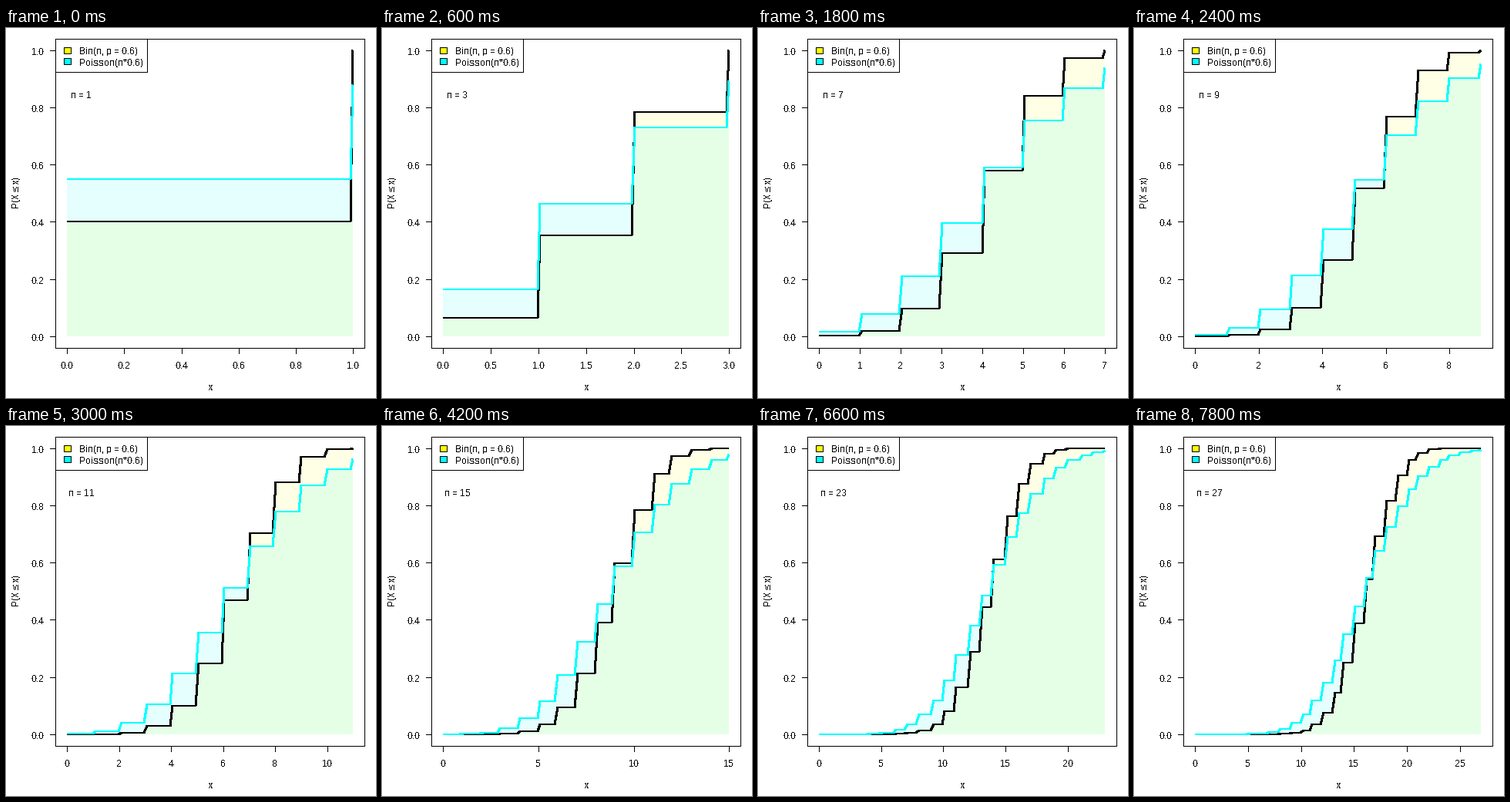
A matplotlib script for the animation above (8000 ms loop, 480 by 480 pixels).

```python
import math

import matplotlib.pyplot as plt
import numpy as np
from matplotlib.animation import FuncAnimation
from matplotlib.patches import Polygon, Rectangle

SIZE = 480
PX = 0.75  # points per pixel at 96 dpi
P = 0.6
LEFT, RIGHT, TOP, BOTTOM = 64, 465, 14, 415
X0, Y0, SPAN = 79.64, 400.36, 371.11
SAMPLES = 101
CYAN = "#00ffff"

plt.rcParams.update({
    "font.family": "Liberation Sans",
    "font.size": 12 * PX,
    "text.hinting": "native",
    "text.hinting_factor": 1,
    "text.antialiased": False,
})

fig = plt.figure(figsize=(5, 5), dpi=96, facecolor="white")
ax = fig.add_axes([0, 0, 1, 1])


def to_x(u):
    return np.floor(X0 + SPAN * u)


def to_y(v):
    return np.floor(Y0 - SPAN * v)


def thin(xs, ys):
    """One pixel wide line through pixel centres."""
    ax.plot(np.array(xs) + 0.5, np.array(ys) + 0.5, color="black", lw=PX,
            antialiased=False, solid_capstyle="projecting",
            solid_joinstyle="miter", snap=False)


def box(x, y, w, h, fill):
    ax.add_patch(Rectangle((x + 0.5, y + 0.5), w, h, facecolor=fill,
                           edgecolor="black", lw=PX, antialiased=False,
                           snap=False))


def label(x, y, text, ha="left", **kw):
    ax.text(x, y, text, ha=ha, va="baseline", **kw)


def tick_step(n):
    """Round tick spacing for an axis from 0 to n with 4% padding."""
    cell = 1.08 * n / 5
    base = 10 ** math.floor(math.log10(cell))
    ratio = cell / base
    for limit, factor in ((7.78, 10), (3.111, 5), (1.556, 2)):
        if ratio > limit:
            return factor * base
    return base


def cdf_curve(pmf, n):
    """Step distribution sampled on an even grid, in pixels."""
    cdf = np.cumsum([pmf(k) for k in range(n + 1)])
    u = np.linspace(0, 1, SAMPLES)
    steps = np.floor(u * n + 1e-7).astype(int)
    return to_x(u), to_y(cdf[steps])


def draw_curve(xs, ys, fill, line):
    base = to_y(0)
    outline = [(xs[0], base), *zip(xs, ys), (xs[-1], base)]
    ax.add_patch(Polygon(outline, facecolor=fill, alpha=0.1, lw=0,
                         antialiased=False, snap=False))
    ax.plot(xs, ys, color=line, lw=2 * PX, antialiased=False, snap=False,
            solid_capstyle="butt", solid_joinstyle="round")


def draw_axes(n):
    thin([LEFT, RIGHT, RIGHT, LEFT, LEFT], [BOTTOM, BOTTOM, TOP, TOP, BOTTOM])
    for i in range(6):
        y = to_y(i / 5)
        thin([LEFT - 7, LEFT], [y, y])
        label(50, y + 6, f"{i / 5:.1f}", ha="right")
    step = tick_step(n)
    for i in range(int(1.04 * n / step + 1e-9) + 1):
        value = i * step
        x = to_x(value / n)
        thin([x, x], [BOTTOM, BOTTOM + 7])
        text = f"{value:.1f}" if step < 1 else f"{value:.0f}"
        label(x, 442, text, ha="center")
    label(265, 470, "x", ha="center")
    ax.text(17, 213.5, "P(X ≤ x)", rotation=90, rotation_mode="anchor",
            ha="center", va="baseline")


def draw_legend():
    box(LEFT, TOP, 119, 43, "white")
    entries = (("yellow", "Bin(n, p = 0.6)", 25, 34),
               (CYAN, "Poisson(n*0.6)", 39, 49))
    for color, text, top, baseline in entries:
        box(75, top, 9, 8, color)
        label(95, baseline, text)


def draw(frame):
    n = 1 + frame // 3
    ax.clear()
    ax.set_xlim(0, SIZE)
    ax.set_ylim(SIZE, 0)
    ax.axis("off")
    mean = n * P

    def binomial(k):
        return math.comb(n, k) * P ** k * (1 - P) ** (n - k)

    def poisson(k):
        return math.exp(-mean) * mean ** k / math.factorial(k)

    draw_axes(n)
    draw_curve(*cdf_curve(binomial, n), "yellow", "black")
    draw_curve(*cdf_curve(poisson, n), CYAN, CYAN)
    draw_legend()
    label(98, 91, f"n = {n}", ha="center")
    return []


anim = FuncAnimation(fig, draw, frames=80, interval=100, repeat=True,
                     repeat_delay=0, init_func=lambda: [])
plt.show()
```
